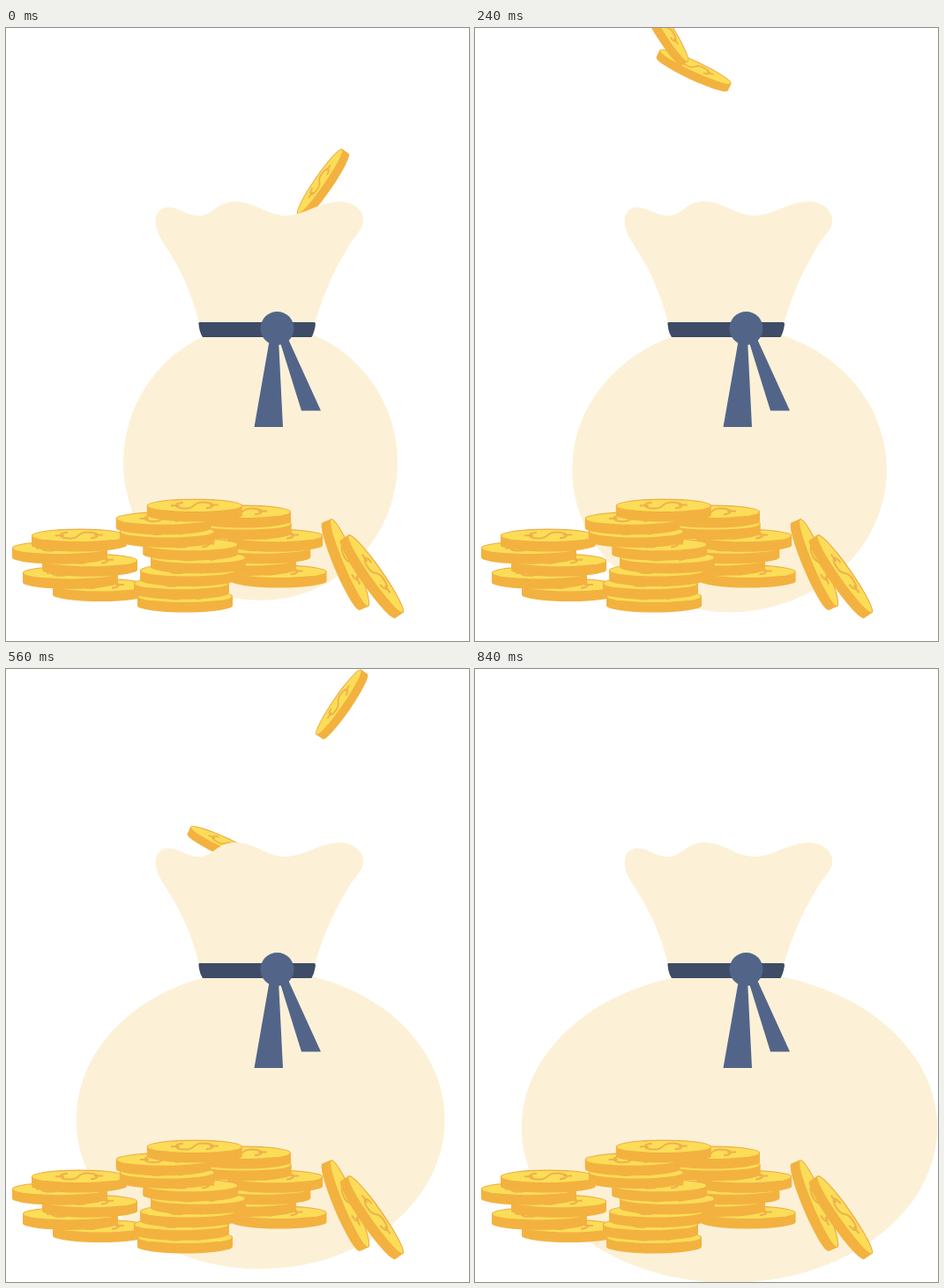
Animation of 525 by 696 pixels, one loop 1000 ms. Source, as an HTML page:

```html
<!DOCTYPE html>
<html>
<head>
<meta charset="utf-8">
<title>Money bag</title>
<style>
  html, body { margin: 0; width: 100%; height: 100%; overflow: hidden; background: #fff; }
  svg { display: block; width: 525px; height: 696px; }
</style>
</head>
<body>
<svg viewBox="0 0 525 696">
  <defs>
    <g id="coin">
      <path d="M-54 0V11A54 7.5 0 0 0 54 11V0Z" fill="#f3b23f"/>
      <ellipse rx="54" ry="7.5" fill="#f0a943"/>
      <ellipse cy=".4" rx="53" ry="6.6" fill="#fbdd57"/>
      <path d="M-27 .3H-17M17 -.6H27M-13 -3.2C-26 -2.5 -23 4 -9 3.4C2 3 -3 -3.6 9 -3.6C23 -3.6 25 2.4 13 3.2"
            fill="none" stroke="#efb04c" stroke-width="2"/>
    </g>
    <clipPath id="air"><path d="M0 0H525V235H0Z"/></clipPath>
  </defs>
  <g id="rain" clip-path="url(#air)"></g>
  <g fill="#fcf1d7">
    <ellipse id="belly" cx="288.5"/>
    <path d="M220 340C210 295 194 268 178 243C166 224 167 208 180 204C194 201 203 213 218 213C236 213 238 197 260 197C282 197 296 213 317 213C338 213 355 197 380 197C398 198 407 211 405 221C403 231 396 235 389 247C372 275 359 303 349 340Z"/>
  </g>
  <path d="M220 334H349Q351 334 351 336Q350 345 346.500 351H223Q219 345 218.500 336Q218 334 220 334Z" fill="#3e4c67"/>
  <g fill="#526589">
    <path d="M299 353H309L314 453H281.500Z"/>
    <path d="M310 354L319 351L357 434.500H335Z"/>
    <circle cx="307.500" cy="341" r="19"/>
  </g>
  <g id="pile"></g>
</svg>
<script>
const $ = id => document.getElementById(id);

function addCoin(parent) {
  const coin = document.createElementNS('http://www.w3.org/2000/svg', 'use');
  coin.setAttribute('href', '#coin');
  return parent.appendChild(coin);
}

function place(coin, x, y, angle = 0, scale = 1) {
  coin.setAttribute('transform', `translate(${x} ${y}) rotate(${angle}) scale(${scale})`);
}

const wave = (i, period, peak) => Math.cos(2 * Math.PI * (i - peak) / period);

// Stacks a number of coins evenly from bottom to top, swaying sideways
function stack(count, bottom, top, xAt) {
  for (let i = 0; i < count; i++) {
    const y = bottom + (top - bottom) * i / (count - 1);
    place(addCoin($('pile')), xAt(i), y);
  }
}

stack(5, 632.5, 576, i => 93 - 6 * i + 14 * wave(i, 2, 0));
stack(6, 617, 549, i => 298 - 3.8 * i + 20 * wave(i, 3.3, 2.8));
stack(8, 645, 542, i => 203 + 5 * i * wave(i, 5, 3));
for (let i = 0; i < 2; i++) {
  place(addCoin($('pile')), 390 + 29.5 * i, 607 + 12.5 * i, 67 - 12 * i);
}

// Each lane passes through x, y at the given times (ms)
const lanes = [
  { x: 250, y: 198, angle: 25, drift: 0, times: [320, 560] },
  { x: 242, y: 154, angle: 58, drift: .3, times: [117, 320] },
  { x: 287, y: 110, angle: 38.7, drift: 0, times: [160, 409] },
  { x: 377, y: 37.5, angle: -55.5, drift: -.3, times: [-71, 320, 560] }
];
const drops = lanes.flatMap(lane =>
  lane.times.map(at => ({ ...lane, at, coin: addCoin($('rain')) })));

const SPEED = 77 / 40, STEP = 40, LAST = 840, LOOP = 1000;

function draw(now) {
  const t = Math.floor(Math.min(now % LOOP, LAST) / STEP) * STEP;

  for (const { coin, at, x, y, angle, drift } of drops) {
    place(coin, x + (t - at) * drift, y + (t - at) * SPEED, angle, .83);
  }

  // The belly swells while staying attached to the neck at y = 351
  const k = t / LAST;
  const rx = 155.5 + 80.2 * k, bottom = 650 + 47 * k;
  const ry = (bottom - 351) / (1 + Math.sqrt(1 - (66 / rx) ** 2));
  $('belly').setAttribute('rx', rx);
  $('belly').setAttribute('ry', ry);
  $('belly').setAttribute('cy', bottom - ry);

  requestAnimationFrame(draw);
}
requestAnimationFrame(draw);
</script>
</body>
</html>
```
